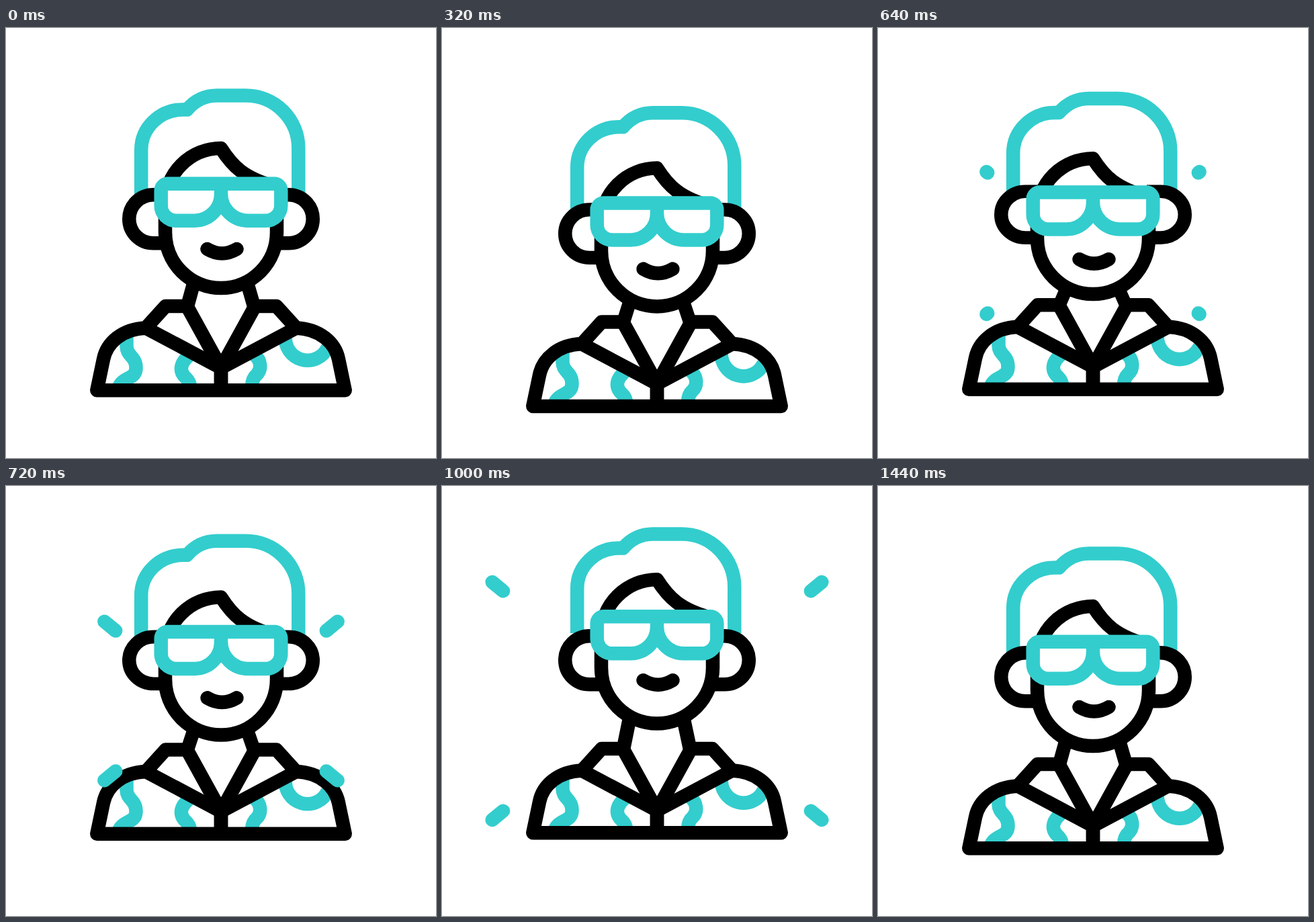
Recreate the animation shown at these times as an HTML page. Size 640 by 640 pixels, loop 1640 ms.

```html
<!DOCTYPE html>
<html lang="en">
<head>
<meta charset="utf-8">
<title>Man with sunglasses</title>
<style>
  /* --bob: whole figure, --nod: lagging extra travel of the head parts */
  @property --bob { syntax: "<number>"; inherits: true; initial-value: 0; }
  @property --nod { syntax: "<number>"; inherits: true; initial-value: 0; }
  @property --tip { syntax: "<number>"; inherits: true; initial-value: 0; }
  @property --tail { syntax: "<number>"; inherits: true; initial-value: 0; }

  html, body { margin: 0; width: 100%; height: 100%; overflow: hidden; background: #fff; }

  svg {
    display: block;
    width: 100%;
    height: 100%;
    fill: none;
    stroke: #000;
    stroke-width: 20.5px;
    stroke-linejoin: round;
    animation: bob 1640ms cubic-bezier(.5, 0, .5, 1) infinite,
               nod 1640ms cubic-bezier(.5, 0, .5, 1) infinite;
  }

  .cyan { stroke: #33cdcd; }
  .solid { fill: #fff; }
  .round { stroke-linecap: round; }

  .part { --k: 0; transform: translateY(calc((var(--bob) + var(--nod) * var(--k)) * 1px)); }
  .hair { --k: .36; }
  .face { --k: .63; }
  .glasses { --k: .86; }
  .front { --k: 1; }

  .neck { transform-origin: 320px 414px; transform: scaleY(calc(1 - var(--nod) * .021)); }
  .ears { transform-origin: 320px 284px; animation: ears 1640ms ease-in-out infinite; }

  .sparks {
    stroke-dasharray: calc((var(--tip) - var(--tail)) * 1px) 400px;
    stroke-dashoffset: calc(var(--tail) * -1px);
    animation: tip 1640ms ease-in-out infinite,
               tail 1640ms ease-in-out infinite,
               show 1640ms step-end infinite;
  }

  @keyframes bob {
    0%, 2.439% { --bob: 0; }
    26.829% { --bob: 28; }
    51.22% { --bob: -30.7; }
    78.049%, 100% { --bob: 0; }
  }
  @keyframes nod {
    0%, 9.756% { --nod: 0; }
    34.146% { --nod: 19.2; }
    58.537% { --nod: -17; }
    84.756%, 100% { --nod: 0; }
  }
  @keyframes ears {
    0%, 2.439% { translate: 0 0; scale: 1 1; }
    19.512% { translate: 0 -1.5px; scale: 1 .99; }
    39.024% { translate: 0 -5px; scale: 1 .955; }
    51.22%, 60.976% { translate: 0 -2px; scale: 1 1; }
    78.049%, 100% { translate: 0 0; scale: 1 1; }
  }
  @keyframes tip {
    0%, 36.585% { --tip: 0; }
    60.976%, 100% { --tip: 114.4; }
  }
  @keyframes tail {
    0%, 43.902% { --tail: 0; }
    68.293%, 100% { --tail: 114.4; }
  }
  @keyframes show {
    0% { opacity: 0; }
    37.2% { opacity: 1; }
    67.9%, 100% { opacity: 0; }
  }
</style>
</head>
<body>
<svg viewBox="0 0 640 640">
  <path class="part hair cyan" d="M201.2 248V181.5A62 60 0 0 1 263 121.5H269.5C281 108 296 100.5 314 100.5H357A78.3 78.3 0 0 1 435.3 178.8V248"/>

  <g class="part ears">
    <path id="ear" d="M240 248.2H219.3A36.05 36.05 0 0 0 219.3 320.3H240"/>
    <use href="#ear" transform="matrix(-1 0 0 1 640 0)"/>
  </g>

  <g class="part">
    <path class="neck" d="M270 414L281 374M369 414L357.5 374"/>
    <g class="cyan">
      <path d="M179.5 456V474C180 489 193.5 488 193.5 506C193.5 523 175 518.5 168 534"/>
      <path d="M272 488C258 500 258 512 268 521Q274 527 274 534"/>
      <path d="M369 486C380 494 381 508 373 516Q366 522 366 534"/>
      <path d="M416 458A33 33 0 0 0 479 475"/>
    </g>
    <g id="side">
      <path d="M320 539.3H135.3L145 493C150 468.5 172.5 448 208 446.5L320 506"/>
      <path d="M208 446.5L237.5 414H269.3L320 506V539.3"/>
    </g>
    <use href="#side" transform="matrix(-1 0 0 1 640 0)"/>
  </g>

  <path class="part face solid" d="M237 262V304A83 83 0 0 0 403 304V262"/>
  <path class="part front" d="M237 262A83 83 0 0 1 320 179C336.5 205 354 224 403 236.5"/>
  <path class="part glasses cyan solid" d="M320 231.7H240.7A10 10 0 0 0 230.7 241.7V264A22.5 22.5 0 0 0 253 286.7H281A39.5 39.5 0 0 0 320 247.5V231.7H399.3A10 10 0 0 1 409.3 241.7V264A22.5 22.5 0 0 1 387 286.7H361A40 40 0 0 1 320 247.5"/>
  <path class="part front round" d="M299.5 329Q321.5 342 343.5 329"/>

  <g class="sparks cyan round">
    <path id="spark" d="M163.2 215.5L74.7 143"/>
    <use href="#spark" transform="matrix(-1 0 0 1 640 0)"/>
    <use href="#spark" transform="matrix(1 0 0 -1 0 640)"/>
    <use href="#spark" transform="matrix(-1 0 0 -1 640 640)"/>
  </g>
</svg>
</body>
</html>
```
